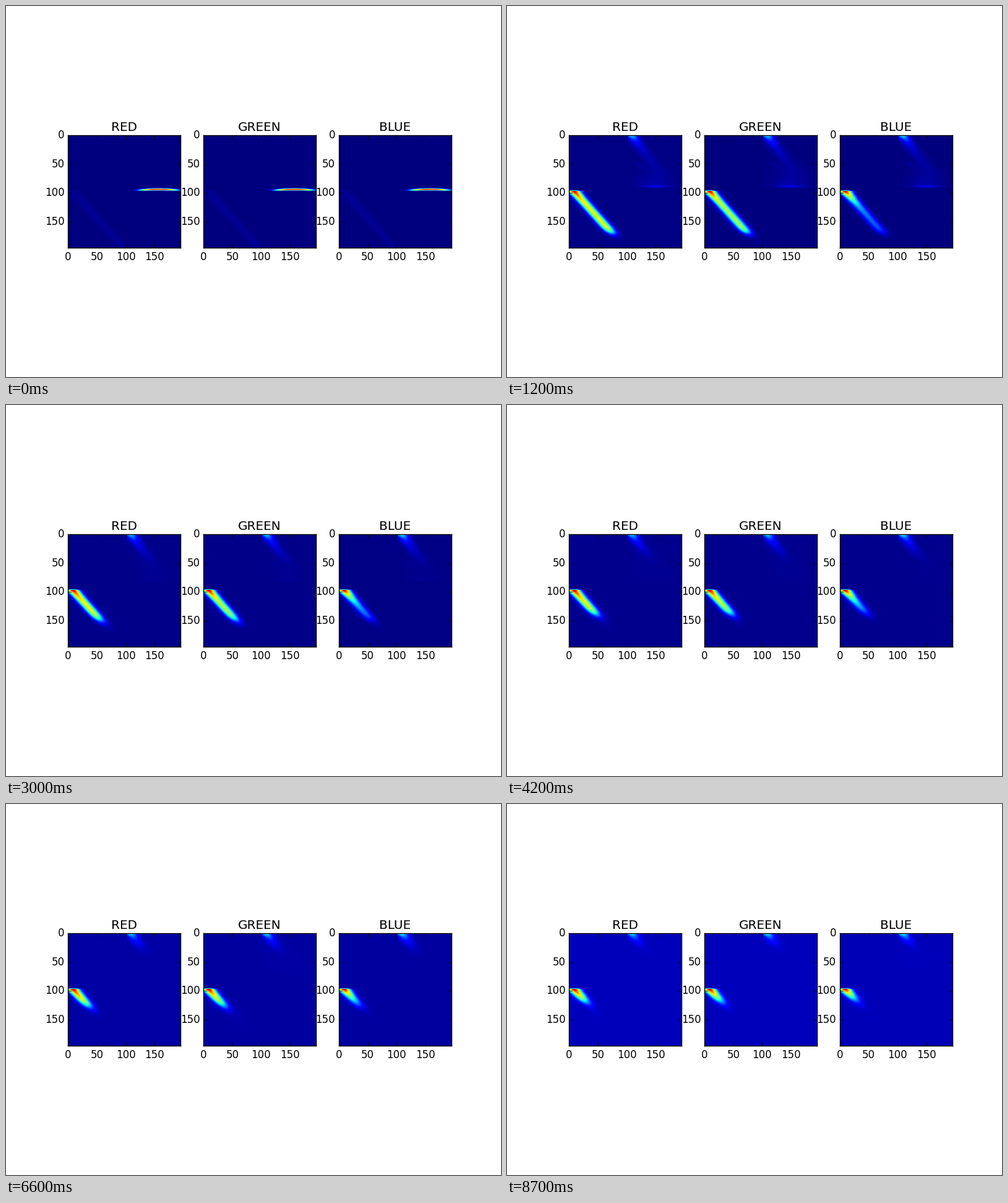
A matplotlib script for the animation above (9 s loop, 800 by 600 pixels).

```python
import numpy as np
import matplotlib.pyplot as plt
from matplotlib.animation import FuncAnimation

plt.style.use("classic")

N = 196
FRAMES, INTERVAL = 30, 300
Y, X = np.mgrid[0:N, 0:N].astype(float)

# Title, beam plateau, decay length, top spot, early base level
CHANNELS = [
    ("RED", 0.63, 8.0, 0.42, 0.003),
    ("GREEN", 0.55, 9.0, 0.44, 0.002),
    ("BLUE", 0.21, 13.0, 0.48, 0.0),
]


def bell(d, width):
    return np.exp(-0.5 * (d / width) ** 2)


def cutoff(s, length, width):
    return 0.5 * (1 - np.tanh(1.2 * (s - length) / width))


def reach(k):
    return np.interp(k, [1, 2, 6, 10, 14, 22, 29], [86, 82, 63, 52, 42, 29, 21])


def lower_beam(k, plateau, decay):
    s = Y - 97
    across = bell(X - 8 - 0.9 * s, 7.0)
    along = plateau + (1 - plateau) * np.exp(-np.abs(s) / decay)
    width = np.interp(k, [2, 6, 29], [6, 10, 12])
    return np.where(s >= 0, along * across * cutoff(s, reach(k), width), 0)


def upper_beam(k, spot):
    along = 0.14 * np.exp(-Y / 30) + (spot - 0.14) * np.exp(-Y / 6)
    across = bell(X - 107 - 0.75 * Y, 6.5 + 0.05 * Y)
    inside = (X >= 101) & (Y < 95)
    return np.where(inside, along * across * cutoff(Y, reach(k), 14), 0)


def haze(k):
    edge = 95 - 1.6 * (k - 2)
    cloud = 0.05 * np.exp(-(k - 2) / 5) * bell(X - 146, 19) * bell(Y - edge, 20)
    glow = 0.2 * np.exp(-(k - 2) / 1.4) * bell(X - 151, 17) * bell(Y - edge + 2.5, 2)
    streak = (0.022 * np.exp(-(k - 2) / 9) * bell(X - 122, 9)
              * bell(Y - 53 - 0.5 * (X - 122), 3))
    inside = (X >= 101) & (Y < edge)
    return np.where(inside, cloud + glow, 0) + streak


def arc():
    u = X - 157
    row = 94.4 + 2 * (u / 38) ** 2
    line = np.exp(-np.abs(u / 35) ** 3) * bell(Y - row, 1.15)
    return np.where((X >= 101) & (Y < 97), line, 0)


def field(k, plateau, decay, spot, base):
    if k == 0:
        s = Y - 97
        trace = 0.02 * bell(X - 7 - 0.9 * s, 7)
        return arc() + np.where(s >= 0, trace, 0)
    light = lower_beam(k, plateau, decay) + upper_beam(k, spot) + haze(k)
    floor = base + 0.00006 * k ** 2
    return floor + (1 - floor) * np.clip(light, 0, 1)


fig, axes = plt.subplots(1, 3, figsize=(8, 6), dpi=100, facecolor="white")
images = []
for ax, (title, *_) in zip(axes, CHANNELS):
    images.append(ax.imshow(np.zeros((N, N)), cmap="jet", vmin=0, vmax=1,
                            interpolation="bilinear"))
    ax.set_title(title)
    ax.set_xticks(range(0, 200, 50))
    ax.set_yticks(range(0, 200, 50))
    ax.set_xlim(-0.5, N - 0.5)
    ax.set_ylim(N - 0.5, -0.5)


def update(k):
    for image, (_, *params) in zip(images, CHANNELS):
        image.set_data(field(k, *params))
    return images


anim = FuncAnimation(fig, update, frames=FRAMES, interval=INTERVAL, repeat=True,
                     repeat_delay=0, init_func=lambda: update(0))
plt.show()
```
